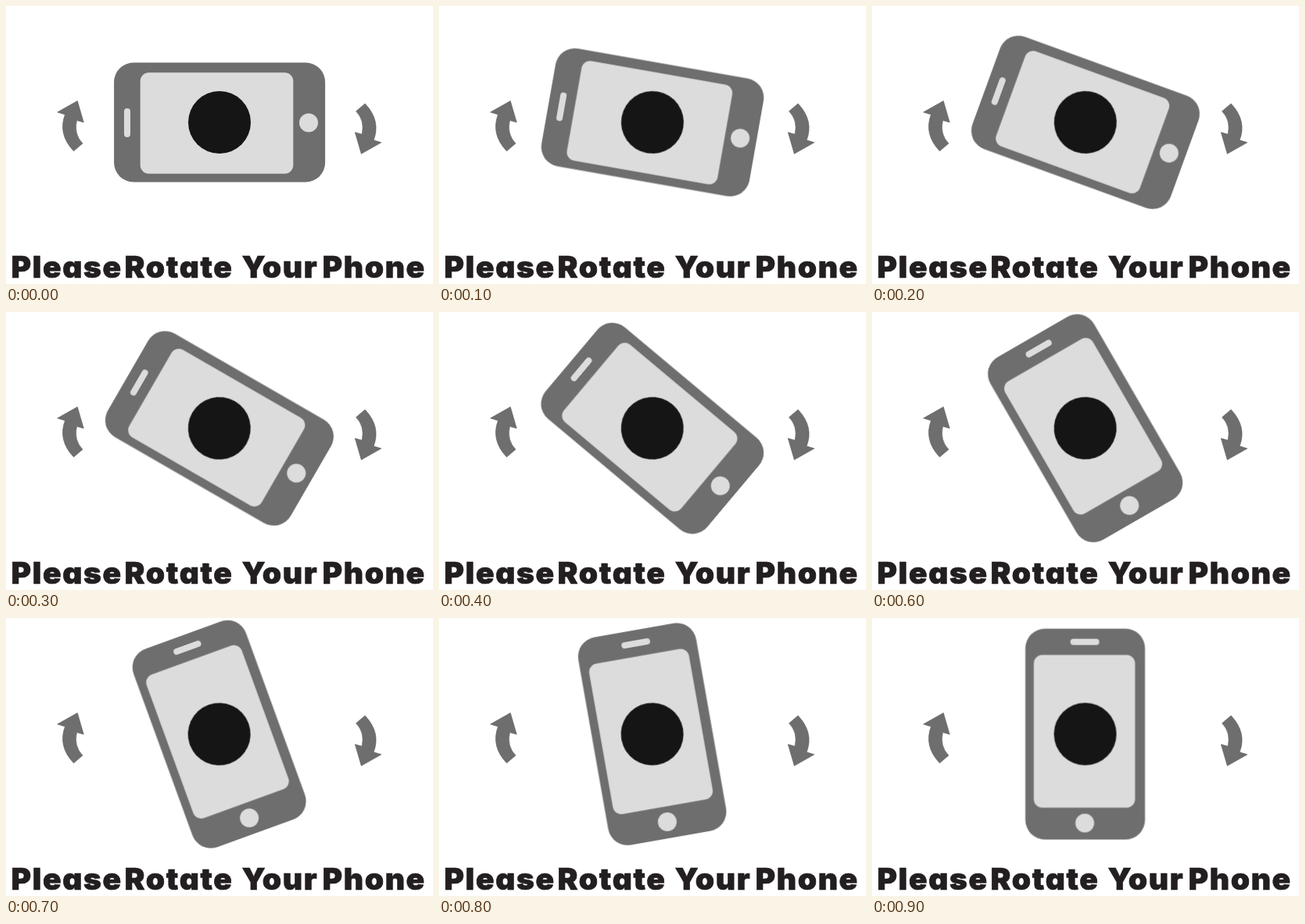
Animation of 546x356 px, one loop 2900 ms. Source, as an HTML page:

```html
<!DOCTYPE html>
<html lang="en">
<head>
<meta charset="utf-8">
<title>Please Rotate Your Phone</title>
<style>
  html, body { margin: 0; width: 100%; height: 100%; overflow: hidden; background: #fff; }
  svg { display: block; width: 546px; height: 356px; }
  .dark { fill: #6e6e6e; }
  .light { fill: #dcdcdc; }
  .arrow { fill: #6e6e6e; stroke: #5c5c5c; stroke-width: .6; }
  #phone { transform-origin: 273px 148.6px; }
  text {
    font: 900 39px Inter, Lato, sans-serif;
    font-feature-settings: "cv11";
    letter-spacing: 1.6px;
    fill: #231f20;
    stroke: #231f20;
    stroke-width: .6;
  }
</style>
</head>
<body>
<svg viewBox="0 0 546 356">
  <defs>
    <path id="arrow" d="M91.3 121.5 L65.7 136 L75.5 139 Q66 164 86.5 185.8 L98 176 Q86.5 164 90.5 146.5 L99.3 149 Z"/>
  </defs>
  <use href="#arrow" class="arrow"/>
  <use href="#arrow" class="arrow" transform="rotate(180 272.8 155.4)"/>

  <g id="phone">
    <rect class="dark" x="138.1" y="72.5" width="270" height="153" rx="25"/>
    <rect class="light" x="171.7" y="85.2" width="195.6" height="129.6" rx="11"/>
    <rect class="light" x="151" y="131" width="8" height="37" rx="4"/>
    <circle class="light" cx="387" cy="149.5" r="12"/>
    <circle cx="273" cy="149" r="40" fill="#151515"/>
  </g>

  <text y="347.8"><tspan x="6.6">Please</tspan> <tspan x="151.6">Rotate</tspan> <tspan x="301.4">Your</tspan> <tspan x="404.6">Phone</tspan></text>
</svg>
<script>
  const LOOP = 2900, TURN = 900;
  const turned = "rotate(90deg)";

  // Nine hard 10-degree steps, then a long hold.
  document.getElementById("phone").animate([
    { transform: "rotate(0deg)", offset: 0, easing: "steps(9, end)" },
    { transform: turned, offset: TURN / LOOP },
    { transform: turned, offset: 1 }
  ], { duration: LOOP, iterations: Infinity });
</script>
</body>
</html>
```
